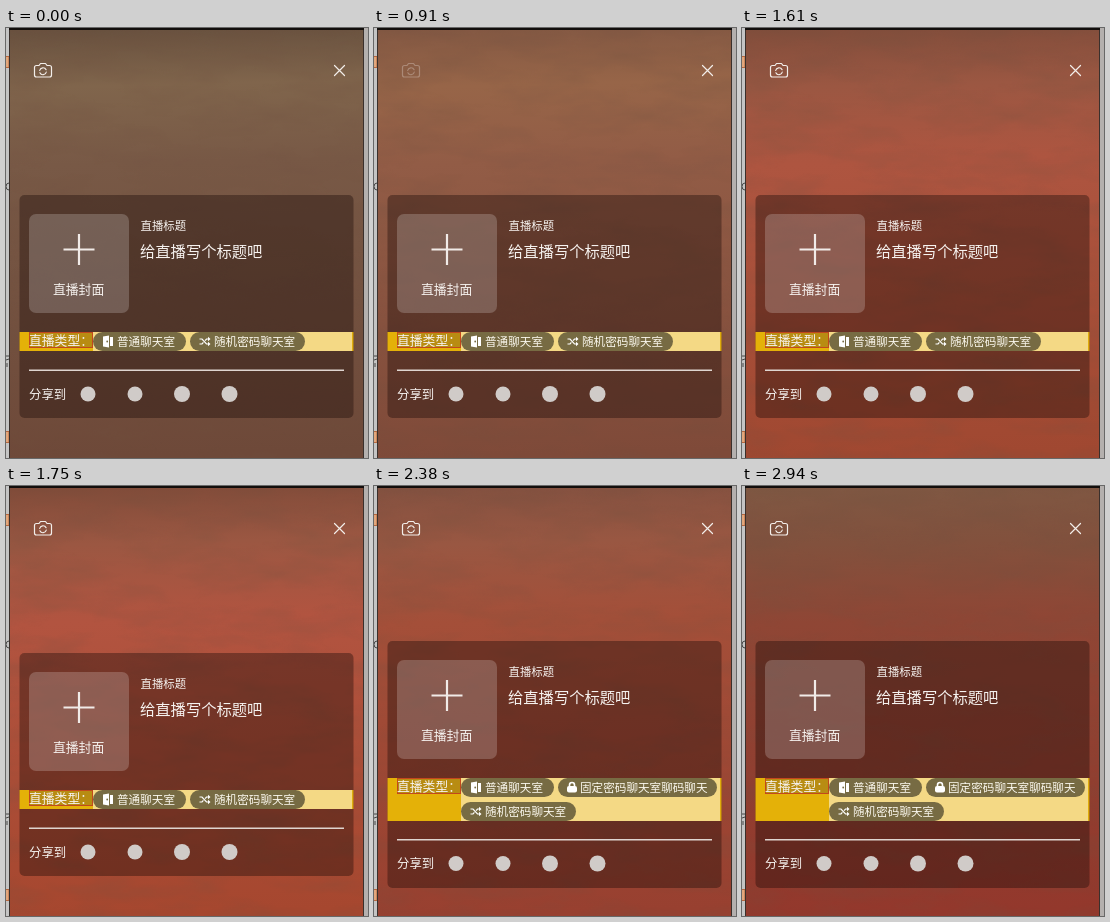
These frames come from a looping animation (362x430 px, 3010 ms). An HTML page:

```html
<!DOCTYPE html>
<html lang="zh-CN">
<head>
<meta charset="utf-8">
<style>
  html, body { margin: 0; width: 100%; height: 100%; overflow: hidden; background: #c4c4c4; }
  svg { display: block; width: 362px; height: 430px; font-family: "Noto Sans CJK SC", "Noto Sans CJK", sans-serif; }
  text { fill: #f6f2ef; dominant-baseline: central; }
  .line { fill: none; stroke: #f3eeea; stroke-width: 1.2; stroke-linecap: round; stroke-linejoin: round; }
  .pill rect { fill: #776b43; }
  .pill text { font-size: 11.6px; fill: #fbf8ee; }
</style>
</head>
<body>
<svg viewBox="0 0 362 430">
  <defs>
    <linearGradient id="wall" gradientUnits="userSpaceOnUse" x1="0" y1="0" x2="10" y2="430"></linearGradient>
    <filter id="grain" x="0" y="0" width="1" height="1">
      <feTurbulence type="fractalNoise" baseFrequency=".014 .04" numOctaves="4" seed="7"/>
      <feColorMatrix values="0 0 0 0 .16  0 0 0 0 .08  0 0 0 0 .05  1.3 0 0 0 -.5"/>
    </filter>
    <g id="door">
      <path d="M0 -5l6 -1v12l-6 -1z" fill="#fff"/>
      <path d="M7 -4.5h3v9h-3z" fill="#fff"/>
      <circle cx="4.2" r=".9" fill="#776b43"/>
    </g>
    <g id="shuffle" fill="none" stroke="#fff" stroke-width="1.2">
      <path d="M0 -2.500h2.500l4.500 5h2M0 2.500h2.500l1.400 -1.600M5.600 -.9l1.400 -1.600h2"/>
      <path d="M8.500 -4.700l2.500 2.200l-2.500 2.200zM8.500 .3l2.500 2.200l-2.500 2.200z" fill="#fff" stroke="none"/>
    </g>
    <g id="lock">
      <rect x="0" y="-1.5" width="10" height="6.5" rx="2" fill="#fff"/>
      <path d="M2.5 -1v-1.5a2.5 2.5 0 0 1 5 0v1.5" fill="none" stroke="#fff" stroke-width="1.6"/>
    </g>
  </defs>

  <rect width="362" height="430" fill="#c4c4c4"/>
  <rect x="357" width="5" height="430" fill="#b4b0ae"/>
  <path d="M0 28.5h3v11h-3M0 403.5h3v11h-3" fill="#e3a77c" stroke="#b5673f"/>
  <path d="M3 155q-3 0 -3 3.500t3 3.500M0 328h3M0 332l3 -1M1 335v4" fill="none" stroke="#444"/>

  <rect x="4" width="353" height="430" fill="url(#wall)"/>
  <rect x="4" width="353" height="430" filter="url(#grain)" opacity=".4"/>
  <path d="M3.500 0V430M357.500 0V430" stroke="#3a302c"/>
  <rect x="3" width="355" height="2" fill="#120e0c"/>

  <g id="camera" class="line">
    <path d="M30.500 37.500h2.500l1.500 -2h5l1.500 2h2.500a2 2 0 0 1 2 2v7.500a2 2 0 0 1 -2 2h-13a2 2 0 0 1 -2 -2v-7.500a2 2 0 0 1 2 -2z"/>
    <path d="M33.700 42.500a3.400 3.400 0 0 1 6.400 -.8M40.300 44a3.400 3.400 0 0 1 -6.400 .8"/>
  </g>
  <path class="line" d="M328.500 37.500l10 10M338.500 37.500l-10 10"/>

  <rect id="panel" x="13.500" width="334" rx="5" fill="#180806" fill-opacity=".38"/>
  <g id="head">
    <rect x="23" y="186" width="100" height="99" rx="7" fill="#fff" fill-opacity=".2"/>
    <path d="M57.500 221.500h31M73 206v31" stroke="#f1ebe8" stroke-width="2.200"/>
    <text x="47" y="260.200" font-size="12.8">直播封面</text>
    <text x="134.500" y="196.500" font-size="11.4">直播标题</text>
    <text x="134" y="222.200" font-size="15.3">给直播写个标题吧</text>
  </g>

  <g id="types">
    <rect class="band" x="13.500" width="73.500" fill="#e4b108"/>
    <rect class="band" x="87" width="260" fill="#f4d985"/>
    <rect class="band" x="346" width="1.500" fill="#dfac0c"/>
    <rect x="23.500" y=".5" width="63" height="15" fill="#b88c12" stroke="#c2481c"/>
    <text x="23" y="7.200" font-size="12.8">直播类型：</text>
    <g class="pill">
      <rect x="87" width="93" height="19" rx="9.500"/>
      <use href="#door" x="97" y="9.500"/>
      <text x="111" y="9">普通聊天室</text>
    </g>
    <g class="pill" id="fixed">
      <rect x="184" width="159" height="19" rx="9.500"/>
      <use href="#lock" x="193" y="9.500"/>
      <text x="206" y="9">固定密码聊天室聊码聊天</text>
    </g>
    <g class="pill" id="random">
      <rect x="87" width="115" height="19" rx="9.500"/>
      <use href="#shuffle" x="96.500" y="9.500"/>
      <text x="111" y="9">随机密码聊天室</text>
    </g>
  </g>

  <g id="foot">
    <path d="M23 342.300h315" stroke="#dfd5d0" stroke-width="1.400"/>
    <text x="23" y="365.500" font-size="12.4">分享到</text>
    <g fill="#d0cbc8">
      <circle cx="82" cy="366" r="7.500"/>
      <circle cx="129" cy="366" r="7.500"/>
      <circle cx="176" cy="366" r="8"/>
      <circle cx="223.500" cy="366" r="8"/>
    </g>
  </g>
</svg>
<script>
const LOOP = 3010, STEP = 70, FIRST = 420;
const $ = id => document.getElementById(id);

// Wall colours at each time, for the heights in STOPS
const STOPS = [0, .14, .32, 1];
const WALL = [
  [420, '#67503e', '#80654c', '#785946', '#6e4939'],
  [910, '#835843', '#976548', '#925c46', '#7f4a39'],
  [1330, '#82503e', '#9a5843', '#a5563f', '#954936'],
  [1750, '#804b39', '#9b5742', '#b25440', '#a6472f'],
  [2030, '#804f3d', '#955643', '#a24e39', '#984130'],
  [2520, '#845241', '#9b5741', '#a54f39', '#984030'],
  [2940, '#7f5843', '#82513d', '#8f4635', '#93382c']
].map(([t, ...c]) => [t, c.map(h => [1, 3, 5].map(i => parseInt(h.slice(i, i + 2), 16)))]);

// Spans with the extra room type shown, and spans with the camera button pressed
const OPEN = [[980, 1540], [2240, LOOP]];
const PRESS = [[840, 980], [1400, 1540], [2100, 2240]];
const within = (spans, t) => spans.some(([a, b]) => t >= a && t < b);

const stops = STOPS.map(offset => {
  const s = document.createElementNS('http://www.w3.org/2000/svg', 'stop');
  s.setAttribute('offset', offset);
  return $('wall').appendChild(s);
});

function paintWall(t) {
  let i = 0;
  while (i < WALL.length - 2 && t >= WALL[i + 1][0]) i++;
  const [t0, from] = WALL[i], [t1, to] = WALL[i + 1];
  const k = Math.min(1, Math.max(0, (t - t0) / (t1 - t0)));
  stops.forEach((s, n) => {
    const rgb = from[n].map((v, j) => Math.round(v + (to[n][j] - v) * k));
    s.setAttribute('stop-color', `rgb(${rgb})`);
  });
}

const move = (id, x, y) => $(id).setAttribute('transform', `translate(${x} ${y})`);

function layout(open) {
  const d = open ? 12 : 0;
  $('panel').setAttribute('y', 167 - d);
  $('panel').setAttribute('height', 223 + 2 * d);
  move('head', 0, -d);
  move('types', 0, 304 - d);
  move('foot', 0, open ? 11.5 : 0);
  move('random', open ? 0 : 97, open ? 24 : 0);
  $('fixed').setAttribute('visibility', open ? 'visible' : 'hidden');
  document.querySelectorAll('.band').forEach(b => b.setAttribute('height', open ? 43 : 19));
}

function draw(now) {
  const t = now % LOOP;
  const held = t < FIRST ? 0 : Math.floor(t / STEP) * STEP;
  paintWall(held);
  layout(within(OPEN, held));
  $('camera').setAttribute('opacity', within(PRESS, held) ? .3 : 1);
  requestAnimationFrame(() => draw(performance.now() - start));
}

const start = performance.now();
draw(0);
</script>
</body>
</html>
```
